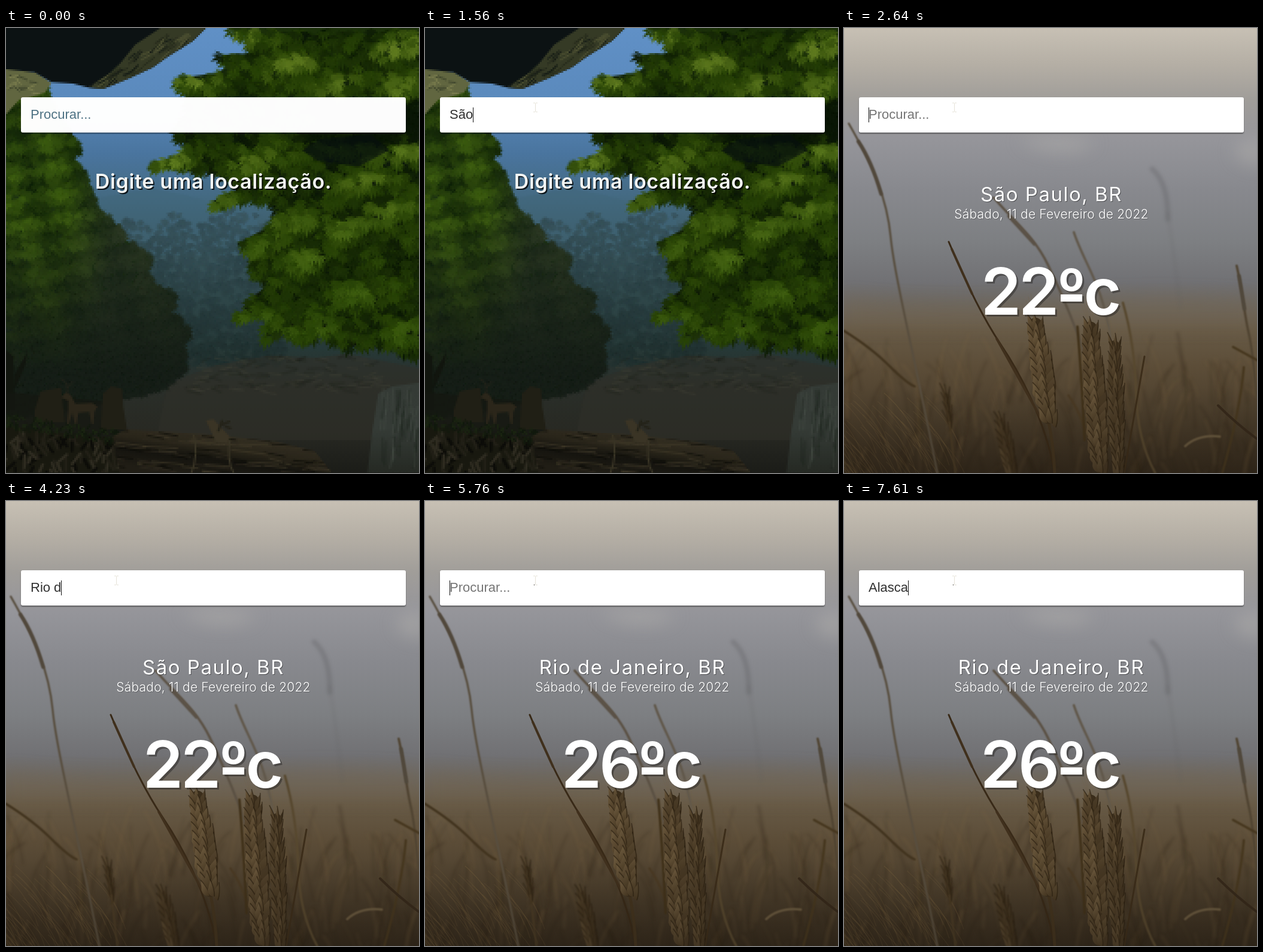
Write an HTML page with a canvas that moves like this. It is 690 px wide and 745 px high and loops after 8000 ms.

```html
<!DOCTYPE html>
<html lang="pt-BR">
<head>
<meta charset="utf-8">
<title>Clima</title>
<style>
  html, body { margin: 0; width: 100%; height: 100%; overflow: hidden; background: #222; }
  #stage { position: relative; width: 690px; height: 745px; overflow: hidden; }
  canvas, svg { position: absolute; left: 0; top: 0; }
  #forest { width: 690px; height: 747px; image-rendering: pixelated; }
  #box { position: absolute; left: 25px; top: 116px; width: 643px; height: 59px;
         border-radius: 3px; box-shadow: 0 2px 2px rgba(0, 0, 0, .38); }
  #field { font: 22px "Liberation Sans", Arial, sans-serif; white-space: pre; }
  .label { font-family: Inter, sans-serif; text-anchor: middle; fill: #fff; }
  #hint { font-size: 34px; font-weight: 600; letter-spacing: .65px; fill: #f3f5f3;
          filter: drop-shadow(2px 2px 0 rgba(0, 0, 0, .8)); }
  #city { font-size: 33px; font-weight: 400; letter-spacing: 1.5px;
          filter: drop-shadow(1.5px 1.5px 0 rgba(0, 0, 0, .42)); }
  #date { font-size: 21px; font-weight: 300; letter-spacing: .2px;
          filter: drop-shadow(1px 1px 0 rgba(0, 0, 0, .25)); }
  #temp { font-size: 108px; font-weight: 600; filter: drop-shadow(3px 3px 0 rgba(40, 38, 36, .5)); }
  #degrees { letter-spacing: -4px; }
</style>
</head>
<body>
<div id="stage">
  <canvas id="forest" width="230" height="249"></canvas>
  <canvas id="wheat" width="690" height="745"></canvas>
  <div id="box"></div>
  <svg width="690" height="745">
    <text id="hint" class="label" x="346.5" y="269">Digite uma localização.</text>
    <g id="weather">
      <text id="city" class="label" x="346.5" y="290"></text>
      <text id="date" class="label" x="346.5" y="319">Sábado, 11 de Fevereiro de 2022</text>
      <g id="temp" class="label">
        <text id="degrees" x="292" y="480"></text>
        <text x="380" y="440" font-size="69" font-weight="700">o</text>
        <path d="M362 446h36v12h-36z"/>
        <text x="432" y="480">c</text>
      </g>
    </g>
    <text id="field" x="41" y="152"></text>
    <path id="caret" d="M0 133h1v25h-1z" fill="#111"/>
    <path id="ibeam" d="M181 125.5h3M185 125.5h3M184.5 126v14M181 140.5h3M185 140.5h3" fill="none"/>
    <path id="speck" d="M182 140h1v1h-1z"/>
  </svg>
</div>
<script>
const $ = id => document.getElementById(id);
const LOOP = 8000;

// time, typed text, caret shown
const TYPING = [
  [0, '', 0], [690, '', 1], [1030, 'S', 1], [1300, 'Sã', 1], [1430, 'São', 1],
  [1700, 'São ', 1], [1960, 'São P', 1], [2160, 'São Pa', 1], [2290, 'São Pau', 1],
  [2360, 'São Paul', 1], [2490, 'São Paulo', 1],
  [2640, '', 1], [2840, '', 0], [3370, '', 1],
  [3770, 'R', 1], [3970, 'Ri', 1], [4040, 'Rio', 1], [4160, 'Rio ', 1], [4230, 'Rio d', 1],
  [4360, 'Rio de', 1], [4490, 'Rio de ', 1], [4760, 'Rio de J', 1], [4960, 'Rio de Ja', 1],
  [5030, 'Rio de Jan', 1], [5230, 'Rio de Jane', 1], [5300, 'Rio de Janei', 1],
  [5360, 'Rio de Janeir', 1], [5430, 'Rio de Janeiro', 1],
  [5760, '', 1], [5950, '', 0],
  [6210, 'A', 1], [6350, 'Aa', 1], [6880, 'Aa', 0], [6950, 'A', 1], [7080, 'Al', 1],
  [7140, 'Ala', 1], [7280, 'Alas', 1], [7480, 'Alasc', 1], [7610, 'Alasca', 1]
];
const PLACES = [[0, '', ''], [2640, 'São Paulo, BR', '22'], [5760, 'Rio de Janeiro, BR', '26']];
const BOX_ALPHA = [[0, .99], [70, .99], [550, .9], [690, .91], [750, .94], [1030, 1], [LOOP, 1]];

let seed = 7;
function rand(a = 0, b = 1) {
  seed = (seed * 1664525 + 1013904223) >>> 0;
  return a + (b - a) * seed / 4294967296;
}
const mix = (a, b, k) => a.map((v, i) => v + (b[i] - v) * k);
const rgb = c => `rgb(${c.map(Math.round)})`;
const clamp = v => Math.max(0, Math.min(1, v));

function gradient(ctx, x0, y0, x1, y1, stops) {
  const g = ctx.createLinearGradient(x0, y0, x1, y1);
  stops.forEach(([k, color]) => g.addColorStop(k, color));
  return g;
}
function shape(ctx, d, fill) {
  ctx.fillStyle = fill;
  ctx.fill(new Path2D(d));
}
function line(ctx, d, color, width) {
  ctx.strokeStyle = color;
  ctx.lineWidth = width;
  ctx.stroke(new Path2D(d));
}
function clipped(ctx, d, draw) {
  ctx.save();
  ctx.clip(new Path2D(d));
  draw();
  ctx.restore();
}

function drawForest() {
  const ctx = $('forest').getContext('2d');
  const S = 1 / 3;
  ctx.scale(S, S);
  ctx.lineCap = 'round';

  // fans of thin pointed leaves, loosely ordered from dark to light
  function foliage(d, count, [x0, y0, x1, y1], size, light, color, aim) {
    const path = new Path2D(d), fans = [];
    while (count-- > 0) {
      const x = rand(x0, x1), y = rand(y0, y1);
      if (!ctx.isPointInPath(path, x * S, y * S)) continue;
      const lum = clamp(light(x, y) + rand(-.2, .2));
      fans.push({ x, y, lum, order: lum + rand(0, .75) });
    }
    fans.sort((a, b) => a.order - b.order);
    for (const { x, y, lum } of fans) {
      ctx.fillStyle = rgb(color(x, y, lum));
      const turn = aim(x, y) + rand(-.5, .5);
      for (let k = -2; k <= 2; k++) {
        const a = turn + k * .5, len = size * (1 - Math.abs(k) * .17);
        const ux = Math.cos(a) * len, uy = Math.sin(a) * len;
        ctx.beginPath();
        ctx.moveTo(x, y);
        ctx.lineTo(x + ux * .5 - uy * .13, y + uy * .5 + ux * .13);
        ctx.lineTo(x + ux, y + uy);
        ctx.lineTo(x + ux * .5 + uy * .13, y + uy * .5 - ux * .13);
        ctx.fill();
      }
    }
  }

  ctx.fillStyle = gradient(ctx, 0, 0, 0, 745, [[0, '#6090c6'], [.15, '#5b8abd'], [.28, '#4a759f'],
    [.38, '#446a82'], [.48, '#3b5860'], [.6, '#2f474a'], [.72, '#263837'], [.8, '#2a2f2a'], [.9, '#282923'], [1, '#1b1c18']]);
  ctx.fillRect(0, 0, 690, 747);
  shape(ctx, 'M120 290L190 278 240 268 300 280 360 296 420 306V380H120z', 'rgba(65,102,122,.5)');

  // misty woods
  const mist = (x, y) => .5 + .4 * Math.sin(x / 23) * Math.cos(y / 31);
  foliage('M165 335L210 312 245 335 285 300 330 325 365 295 440 315 470 560H190z', 1500, [165, 295, 470, 560], 13,
    mist, (x, y, l) => mix(mix([49, 74, 82], [60, 88, 97], l), [33, 49, 48], clamp((y - 330) / 210)), () => 1.57);

  // far bank and falls
  shape(ctx, 'M270 595L350 565 440 548 520 552 570 545 690 570V690H250z', 'rgba(48,48,41,.6)');
  for (let i = 0; i < 110; i++) {
    const x = rand(300, 620), y = rand(550, 610);
    line(ctx, `M${x} ${y}l${rand(10, 24)} ${rand(-7, 7)}`, i % 2 ? 'rgba(67,66,54,.25)' : 'rgba(28,30,25,.25)', 4);
  }
  shape(ctx, 'M622 612L645 600 690 594V745H604L612 675z',
    gradient(ctx, 0, 594, 0, 745, [[0, '#343a35'], [.5, '#353b36'], [1, '#252923']]));
  for (let i = 0; i < 45; i++) {
    const x = rand(622, 690), y = rand(600, 710);
    line(ctx, `M${x} ${y}l${rand(-6, 2)} ${rand(15, 40)}`, i % 2 ? 'rgba(75,82,74,.25)' : 'rgba(25,30,25,.25)', 4);
  }

  // left tree
  const leftTree = 'M0 112L65 96 82 140 112 180 122 200 112 215 130 240 140 270 152 300 190 335 200 355 238 382 232 408 250 430 278 445 275 475 305 508 292 530 300 565 268 595 220 612 0 650z';
  shape(ctx, leftTree, gradient(ctx, 0, 110, 0, 650, [[0, '#21390f'], [.45, '#1b2f12'], [.75, '#18231a'], [1, '#14190f']]));
  const leftLight = (x, y) => .38 + .3 * Math.sin(x / 21 + y / 17) * Math.sin(y / 12 - x / 40);
  foliage(leftTree, 6500, [0, 95, 320, 650], 16, leftLight, (x, y, l) => {
    const lit = mix([15, 32, 9], [76, 112, 20], l);
    const olive = mix([28, 42, 26], [55, 68, 42], l);
    return mix(mix(lit, olive, clamp((x + y * .15 - 145) / 85)), [23, 31, 24], clamp((y - 310) / 260));
  }, x => 1.4 - x / 300);
  shape(ctx, 'M0 540L12 550 15 640H0zM15 580L36 542 32 565 14 605z', '#11150e');

  // overhanging rock
  shape(ctx, 'M0 66L50 74 76 92 65 108 40 116 22 120 0 145z', '#616640');
  for (let i = 0; i < 15; i++) line(ctx, `M${rand(0, 45)} ${rand(78, 110)}l${rand(6, 16)} ${rand(-6, 8)}`, i % 2 ? '#454b30' : '#777a4c', 3);
  shape(ctx, 'M0 0H334L312 22 270 48 245 66 206 84 162 102 138 100 112 93 76 91 48 74 0 69z', '#0c1213');
  const ledge = 'M258 0H334L312 22 270 48 245 66 206 84 162 102 138 99 176 74 192 58 216 28z';
  shape(ctx, ledge, '#353a25');
  clipped(ctx, ledge, () => {
    for (let i = 0; i < 55; i++) {
      const k = rand(), x = 305 - k * 130 + rand(-25, 20), y = 6 + k * 82 + rand(-8, 8);
      line(ctx, `M${x} ${y}l${rand(-22, -8)} ${rand(7, 17)}`, ['#272c1c', '#4a4d30', '#191f17'][i % 3], 3);
    }
  });

  // right tree
  const rightTree = 'M368 0H690V552L650 535 615 525 575 535 530 512 495 522 465 505 430 520 440 482 390 482 415 448 450 422 410 405 412 372 385 362 440 332 458 305 440 285 390 286 352 300 345 290 390 268 380 250 310 238 240 230 300 208 310 192 285 178 310 130 300 98 285 84 350 76 375 62 360 45 412 42 410 18z';
  shape(ctx, rightTree, gradient(ctx, 0, 0, 0, 555, [[0, '#1b3009'], [.3, '#0d190b'], [.7, '#0e1b06'], [1, '#0c1408']]));
  const glow = [[405, 10], [470, 55], [320, 82], [540, 92], [655, 25], [665, 85], [660, 205], [275, 218], [430, 215],
    [355, 286], [480, 320], [600, 250], [400, 368], [500, 382], [570, 330], [645, 300], [420, 485], [590, 440], [510, 500], [670, 500]];
  const rightLight = (x, y) => glow.reduce((m, [gx, gy]) =>
    Math.max(m, Math.exp(-((x - gx) ** 2 / 2400 + (y - gy + (x - gx) * .2) ** 2 / 420))), 0) * .48 + .2
    + .1 * Math.sin(x / 17) * Math.sin(y / 13) - (x > 510 && y > 110 && y < 190 ? .3 : 0);
  foliage(rightTree, 4600, [230, 0, 690, 555], 23, rightLight, (x, y, l) => {
    const dim = clamp((y - 60) / 380);
    return l < .45 ? mix([10, 22, 6], [40, 66, 7], l / .45)
      : mix([40, 66, 7], mix([128, 156, 46], [72, 106, 20], dim), (l - .45) / .55);
  }, x => 2.75 - (x - 210) / 330);
  shape(ctx, 'M525 185L610 178 640 205 590 232 520 222 495 205z', 'rgba(6,14,15,.6)');

  // clearing: stumps, deer, ground and logs
  shape(ctx, 'M0 610L60 615 160 625 200 672 190 690 0 690z', 'rgba(20,23,17,.8)');
  shape(ctx, 'M48 640L58 608 92 602 98 660H48zM162 612L176 600 194 604 196 635 202 672H158z', '#201f15');
  shape(ctx, 'M92 619L100 610 108 614 116 629 144 628 153 634 148 642 146 663H143L139 643 121 644 118 663H115L111 644 105 663H102L104 640 104 624z', '#2b261a');
  line(ctx, 'M103 610L101 594 92 588M103 602L111 592', '#25231a', 2);

  const ground = 'M0 665L60 674 120 682 190 688 215 745H0z';
  shape(ctx, ground, '#18180f');
  clipped(ctx, ground, () => {
    for (let i = 0; i < 80; i++)
      line(ctx, `M${rand(-10, 195)} ${rand(675, 745)}l${rand(-16, 16)} ${rand(8, 22)}`, ['#2e2b20', '#0c0c08', '#211f16'][i % 3], 5);
  });
  for (let i = 0; i < 150; i++) {
    const x = rand(0, 190), y = 650 + x * .15 + rand(0, 22);
    line(ctx, `M${x} ${y}l${rand(-5, 5)} ${rand(-7, -3)}`, i % 2 ? '#1a2411' : '#10180c', 3);
  }
  const trunk = 'M178 684L200 672 335 680 450 692 515 708 545 745H190z';
  shape(ctx, trunk, gradient(ctx, 300, 672, 290, 745, [[0, '#332e21'], [.35, '#282419'], [.6, '#14130e'], [1, '#201d15']]));
  clipped(ctx, trunk, () => {
    for (let i = 0; i < 110; i++) {
      const x = rand(170, 520), y = rand(672, 745) + (x - 190) * .06;
      line(ctx, `M${x} ${y}l${rand(20, 60)} ${rand(2, 8)}`, ['rgba(64,58,41,.6)', 'rgba(12,12,8,.6)', 'rgba(45,41,30,.6)'][i % 3], 3);
    }
  });
  shape(ctx, 'M334 657L346 655 374 684 370 695 350 692z', '#3a3425');
  line(ctx, 'M355 674l6 -16m0 6l12 -5m-6 8l8 3', '#242319', 4);
  line(ctx, 'M314 682Q322 712 310 745M374 690Q368 722 380 745', '#393425', 3);
}

function drawWheat() {
  const ctx = $('wheat').getContext('2d');
  ctx.lineCap = 'round';
  ctx.fillStyle = gradient(ctx, 0, 0, 0, 745, [[0, '#c7c0b4'], [.08, '#b5afa5'], [.16, '#a09d99'], [.25, '#95959a'],
    [.36, '#88898e'], [.48, '#7d7f82'], [.57, '#717174'], [.63, '#6b655c'], [.68, '#675a46'], [.76, '#5c4d38'],
    [.86, '#4c3f2d'], [1, '#33291c']]);
  ctx.fillRect(0, 0, 690, 745);

  const soft = (blur, draw) => { ctx.filter = `blur(${blur}px)`; draw(); ctx.filter = 'none'; };
  soft(14, () => {
    shape(ctx, 'M290 190Q350 172 420 192 400 212 340 206zM650 205Q670 180 700 185V232Q660 230 650 205z', 'rgba(184,182,178,.4)');
    shape(ctx, 'M0 450Q180 470 340 455T690 452V500H0z', 'rgba(121,105,80,.3)');
  });
  soft(2.5, () => {
    for (let i = 0; i < 230; i++) {
      const x = rand(-60, 740), y = rand(510, 740), lean = rand(-45, 45), h = rand(40, 130);
      line(ctx, `M${x} ${y + h}q${lean * .2} ${-h * .6} ${lean} ${-h}`,
        i % 2 ? 'rgba(128,106,72,.16)' : 'rgba(37,28,16,.2)', rand(1.5, 5));
    }
    line(ctx, 'M515 236Q542 260 541 320', 'rgba(92,92,96,.3)', 9);
    line(ctx, 'M541 310Q552 380 562 470', 'rgba(92,92,96,.15)', 4);
  });
  for (let i = 0; i < 70; i++) {
    const x = rand(-70, 160), y = rand(610, 745);
    line(ctx, `M${x + 60} ${y + 90}q-15 -50 -60 -90`, 'rgba(124,102,67,.22)', 1.2);
  }

  // thin stalks
  soft(.8, () => {
    line(ctx, 'M8 160C48 230 72 285 78 350S120 560 156 745', '#584e3f', 3.5);
    line(ctx, 'M24 190Q46 222 62 278', '#51483c', 6);
    line(ctx, 'M250 284C290 330 318 350 340 395S420 570 430 660', '#5b5144', 4);
    line(ctx, 'M275 315L318 362', '#5a5146', 5);
    line(ctx, 'M384 342C400 390 425 420 440 490S460 560 462 600', '#61584b', 4);
    line(ctx, 'M466 460Q486 530 488 610T520 745', '#57482f', 4);
    line(ctx, 'M656 398C666 440 668 475 676 510S684 570 690 620', '#504432', 4);
    line(ctx, 'M660 415L669 470', '#50483c', 6);
    line(ctx, 'M0 507Q45 535 75 565T118 600', '#42341f', 4);
    line(ctx, 'M650 534L690 556', '#46371f', 4);
    line(ctx, 'M668 568Q662 640 632 745', '#46371f', 4);
    line(ctx, 'M570 700Q592 680 628 684', '#6a5a40', 4);
    line(ctx, 'M375 615Q400 650 418 720', '#4a3a24', 4);
    line(ctx, 'M390 500Q398 600 402 690', '#403119', 4);
  });
  line(ctx, 'M175 358C205 430 235 490 262 530S335 650 352 745', '#382917', 3);
  line(ctx, 'M180 370L214 445M255 520L330 655', '#40301d', 4);
  line(ctx, 'M502 550Q488 630 468 745', '#3c2d1a', 3);
  line(ctx, 'M625 632Q655 662 690 688', '#35281a', 4);

  // pointed grains set in pairs along a stem, with fine awns
  function ear(x0, y0, x1, y1, width, bright) {
    const dx = x1 - x0, dy = y1 - y0, len = Math.hypot(dx, dy), tilt = Math.atan2(dy, dx) - Math.PI / 2;
    for (let i = 0; i < 9; i++)
      line(ctx, `M${x0} ${y0 + i * 8}l${(i - 4) * 4} ${-40 - (i % 3) * 14}`, 'rgba(118,98,66,.25)', 1);
    line(ctx, `M${x0} ${y0}L${x1} ${y1}`, '#3a2d1b', width * .5);
    const rows = Math.round(len / 15);
    for (let i = 0; i <= rows; i++) {
      const k = i / rows, w = width * (.45 + .55 * Math.sin(Math.PI * clamp(k * .75 + .1)));
      for (const side of [-1, 1, 0]) {
        const tone = bright - (side > 0 ? .2 : 0) + rand(-.18, .12);
        ctx.save();
        ctx.translate(x0 + dx * k + rand(-2, 2), y0 + dy * k + side * 4);
        ctx.rotate(tilt + side * .3);
        ctx.translate(side * w * .3, 0);
        shape(ctx, `M0 -17Q${w * .26} -2 ${w * .08} 11Q${-w * .26} 8 ${-w * .2} -3z`,
          gradient(ctx, -w * .2, -12, w * .2, 12, [[0, rgb(mix([56, 44, 28], [136, 114, 80], tone))], [1, '#43341f']]));
        line(ctx, `M${w * .1} 10Q${w * .17} -2 0 -19`, 'rgba(36,26,14,.6)', 1.6);
        ctx.restore();
      }
    }
  }
  line(ctx, 'M342 660Q350 700 352 745', '#42331e', 5);
  ear(320, 496, 342, 652, 44, .62);
  ear(412, 502, 428, 735, 42, .52);
  ear(452, 530, 459, 745, 28, .38);
  soft(1, () => {
    ear(262, 660, 280, 745, 28, .3);
    ear(170, 615, 176, 660, 12, .35);
    line(ctx, 'M176 660L186 745', '#4a3b25', 3);
  });
  ctx.fillStyle = gradient(ctx, 0, 600, 0, 745, [[0, 'rgba(30,23,14,0)'], [1, 'rgba(30,23,14,.25)']]);
  ctx.fillRect(0, 600, 690, 145);
}

const at = (table, t) => table.findLast(row => row[0] <= t);
function ramp(table, t) {
  const i = table.findIndex(row => row[0] > t), [t0, a] = table[i - 1], [t1, b] = table[i];
  return a + (b - a) * (t - t0) / (t1 - t0);
}
const show = (id, on) => { $(id).style.visibility = on ? 'visible' : 'hidden'; };

function render() {
  const t = performance.now() % LOOP;
  const [, text, caretOn] = at(TYPING, t), [, city, degrees] = at(PLACES, t);
  show('wheat', city);
  show('weather', city);
  show('hint', !city);
  $('city').textContent = city;
  $('degrees').textContent = degrees;

  $('box').style.background = `rgba(255,255,255,${ramp(BOX_ALPHA, t)})`;
  const field = $('field');
  field.textContent = text || 'Procurar...';
  field.style.fill = text ? '#303030' : t < 70 ? '#4d7183' : '#757575';
  const end = text ? field.getComputedTextLength() : 0;
  $('caret').setAttribute('transform', `translate(${Math.floor(41 + end)})`);
  show('caret', caretOn);
  show('ibeam', t >= 550);
  $('ibeam').style.stroke = t < 1030 ? '#222' : '#e6e3d8';
  show('speck', t >= 5760);
  requestAnimationFrame(render);
}

drawForest();
drawWheat();
render();
</script>
</body>
</html>
```
